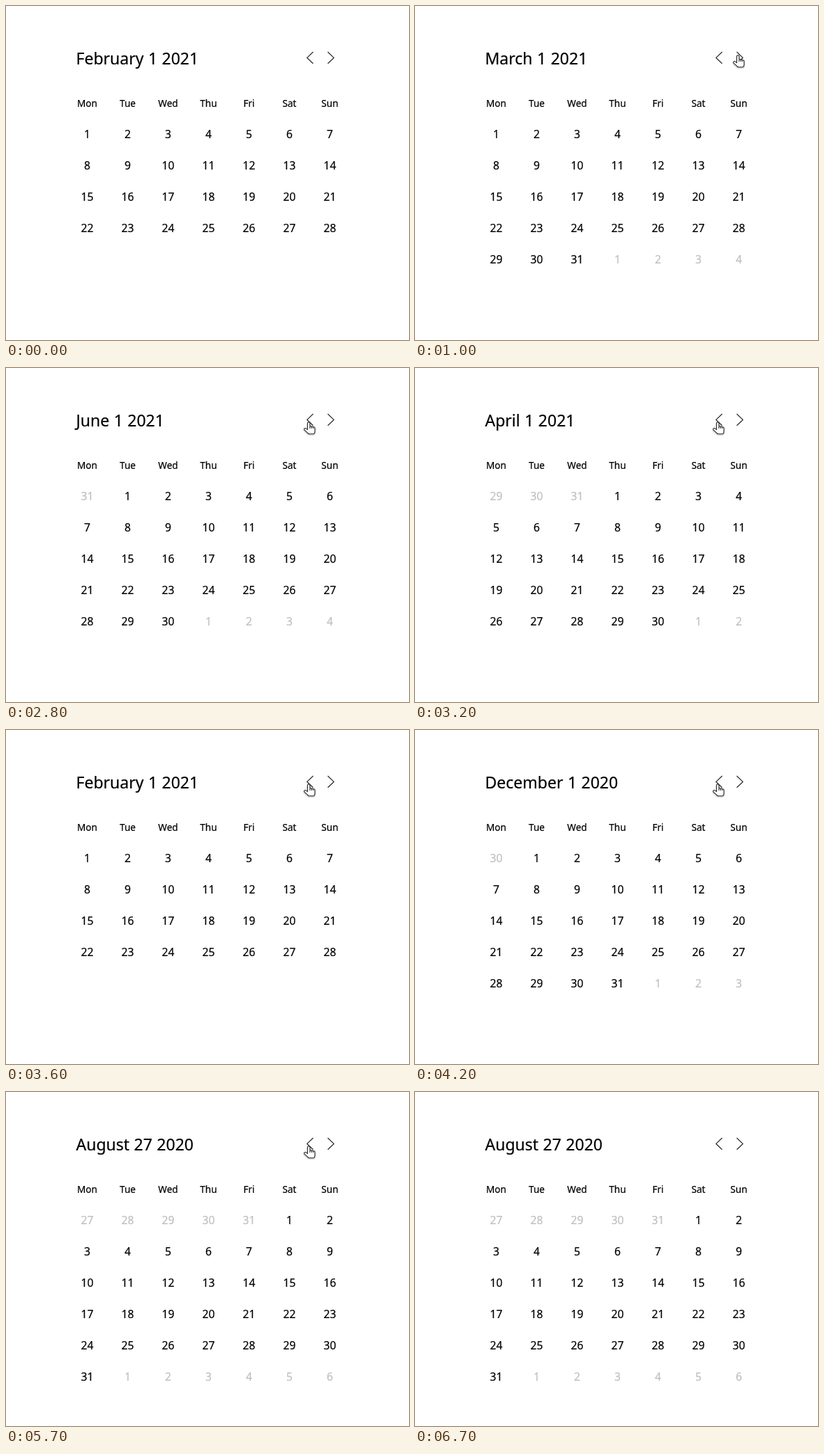
Recreate the animation shown at these times as an HTML page. Size 578x480 px, loop 7.8 s.

```html
<!DOCTYPE html>
<html lang="en">
<head>
<meta charset="utf-8">
<title>Calendar</title>
<style>
  html, body { margin: 0; width: 100%; height: 100%; overflow: hidden; background: #fff; }
  svg { display: block; font-family: "Noto Sans", "Open Sans", sans-serif; }
  text { stroke: #000; stroke-width: .2px; }
  .title { font-size: 23px; word-spacing: .5px; }
  .head { font-size: 13.6px; text-anchor: middle; }
  .day { font-size: 15.7px; text-anchor: middle; }
  .other { fill: #bfbfbf; stroke: #bfbfbf; }
  .nav { fill: none; stroke: #2b2b2b; stroke-width: 1.25; }
  .pointer { fill: #fff; stroke: #333; stroke-width: 1.15; stroke-linejoin: round;
    filter: drop-shadow(0 1px 1px #0005); }
</style>
</head>
<body>
<svg width="578" height="480" viewBox="0 0 578 480">
  <text id="title" class="title" x="100.5" y="84"></text>
  <path class="nav" d="M440.5 66l-8.7 8.4 8.7 8.4M461.5 66l8.7 8.4-8.7 8.4"/>
  <g id="heads"></g>
  <g id="days"></g>
  <g id="cursor" class="pointer">
    <path id="hand" d="M5.5 11.7V2.5a1.7 1.7 0 0 1 3.4 0V7q1.3-1 2.5.3 1.3-.7 2.4.6 1.8-.6 2.2 1.2V14q0 3.7-2.5 3.7H8q-1.5 0-2.5-1.6L.8 11.8q-.6-2 1.4-2.3 1 0 3.3 2.2zM8.9 7v3M11.4 7.3V10M13.8 7.9v2.2"/>
    <path id="arrow" d="M0 0V15l3.5-3.2 2.3 5.2 2.3-1-2.3-5h4.7z"/>
  </g>
</svg>
<script>
const LOOP = 7800, TICK = 100;
const ENTER = 100, EXIT = 6600;
const $ = id => document.getElementById(id);

// Click times in ms on the two buttons
const NEXT = [1000, 1600, 2000, 2400];
const PREV = [3100, 3200, 3400, 3500, 3800, 4100, 4400, 4800, 5000, 5700];
const TODAY = new Date(2020, 7, 27);

const label = (cls, x, y, text) => `<text class="${cls}" x="${x}" y="${y}">${text}</text>`;
const columnX = i => 116.5 + 58 * i;
const countUntil = (times, t) => times.filter(time => time <= t).length;

// Eased progress from 0 to 1 between two times
function ease(t, start, end) {
  const k = Math.min(1, Math.max(0, (t - start) / (end - start)));
  return k * k * (3 - 2 * k);
}

$("heads").innerHTML = ["Mon", "Tue", "Wed", "Thu", "Fri", "Sat", "Sun"]
  .map((name, i) => label("head", columnX(i), 145, name)).join("");

let shown;
function showMonth(m) {
  if (m === shown) return;
  shown = m;
  const first = new Date(2021, m, 1), last = new Date(2021, m + 1, 0);
  const date = TODAY >= first && TODAY <= last ? TODAY : first;
  const name = date.toLocaleString("en-US", { month: "long" });
  $("title").textContent = `${name} ${date.getDate()} ${date.getFullYear()}`;

  const lead = (first.getDay() + 6) % 7;
  const cells = Math.ceil((lead + last.getDate()) / 7) * 7;
  let html = "";
  for (let i = 0; i < cells; i++) {
    const day = new Date(2021, m, i - lead + 1);
    const cls = day < first || day > last ? "day other" : "day";
    html += label(cls, columnX(i % 7), 190 + 45 * Math.floor(i / 7), day.getDate());
  }
  $("days").innerHTML = html;
}

function placeCursor(t) {
  const arrive = ease(t, ENTER, 800), nudge = ease(t, 1200, 1400);
  const cross = ease(t, 2400, 2800), leave = ease(t, EXIT - TICK, EXIT);
  const x = 500 - 44 * arrive + 4 * nudge - 33 * cross - 150 * leave;
  const y = 116 - 46 * arrive + nudge + 6 * cross + 69 * leave;
  const isHand = t >= 600 && t < EXIT;
  $("cursor").style.display = t >= ENTER && t <= EXIT ? "" : "none";
  $("cursor").setAttribute("transform", `translate(${x} ${y})`);
  $("hand").style.display = isHand ? "" : "none";
  $("arrow").style.display = isHand ? "none" : "";
}

function draw() {
  const t = Math.floor(performance.now() % LOOP / TICK) * TICK;
  showMonth(1 + countUntil(NEXT, t) - countUntil(PREV, t));
  placeCursor(t);
  requestAnimationFrame(draw);
}
draw();
</script>
</body>
</html>
```
